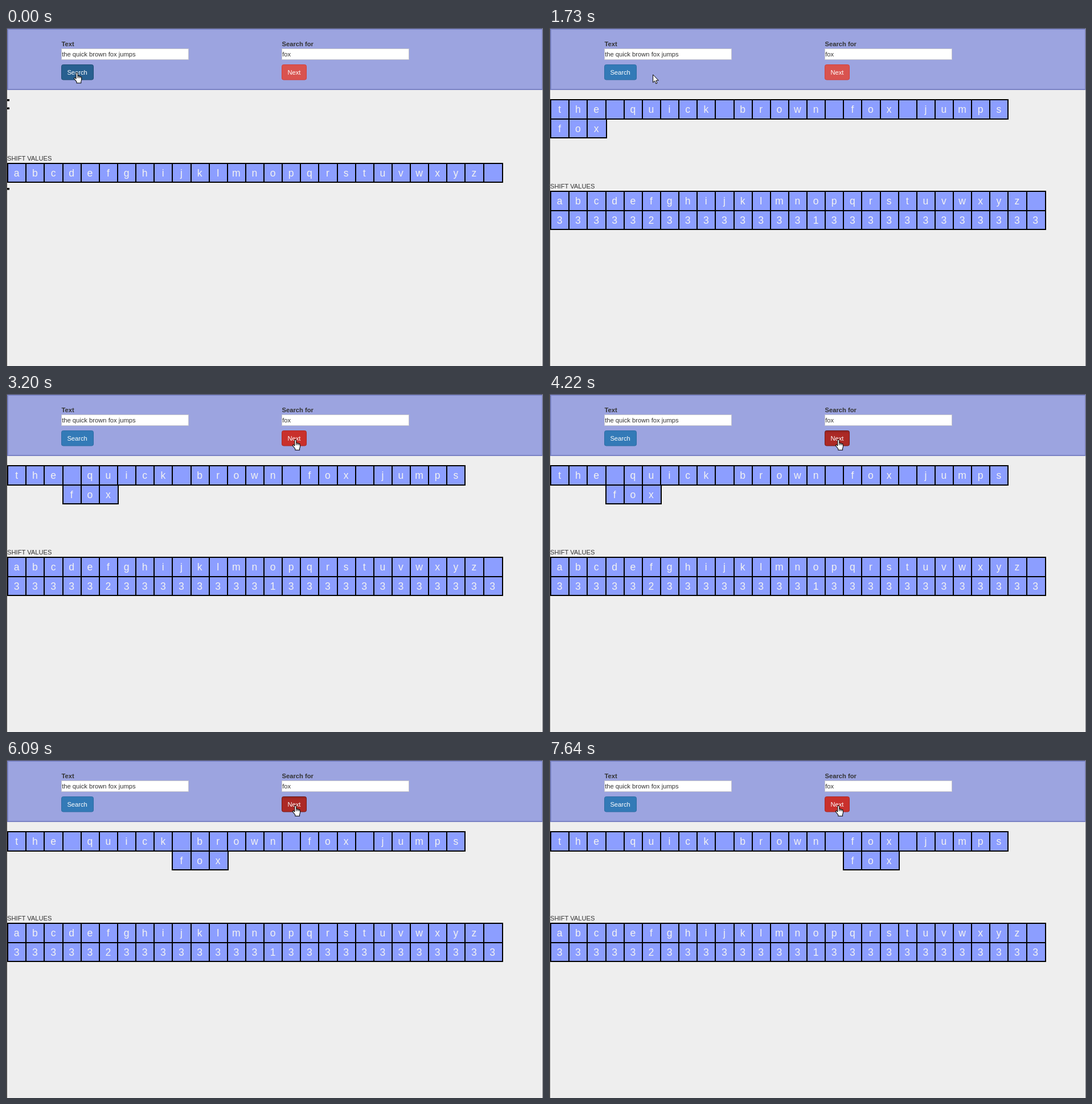
An HTML page that plays this animation: 943x594 px, repeating every 8 s.

```html
<!DOCTYPE html>
<html lang="en">
<head>
<meta charset="utf-8">
<title>Shift table search</title>
<style>
html, body { margin: 0; width: 100%; height: 100%; overflow: hidden; background: #eee; }
svg { display: block; width: 943px; height: 594px; }
text { font-family: "Liberation Sans", Arial, sans-serif; font-size: 11.2px; fill: #333; white-space: pre; }
.bold { font-weight: bold; }
.light { fill: #fff; }
.cell { font-size: 17.6px; fill: #f2f2f2; text-anchor: middle; }
</style>
</head>
<body>
<svg id="stage" viewBox="0 0 943 594" xmlns="http://www.w3.org/2000/svg">
  <defs>
    <linearGradient id="inset" x1="0" y1="0" x2="0" y2="1">
      <stop offset="0" stop-color="#000" stop-opacity=".16"/>
      <stop offset=".22" stop-color="#000" stop-opacity="0"/>
    </linearGradient>
  </defs>
  <rect width="943" height="594" fill="#eee"/>
  <rect x="3" y="2" width="939" height="106" fill="#9ca4e0" stroke="#7982c4" stroke-width="2"/>
  <path d="M0 0H943V1H2V594H0Z" fill="#4a4a4c"/>
  <rect x="942" y="0" width="1" height="594" fill="#77777c"/>
</svg>
<script>
const NS = "http://www.w3.org/2000/svg";
const stage = document.getElementById("stage");
const LOOP = 8000;
const phrase = "the quick brown fox jumps";
const pattern = "fox";
const alphabet = "abcdefghijklmnopqrstuvwxyz ";
const shifts = [...alphabet].map(c => ({ f: 2, o: 1 })[c] || 3).join("");

function add(tag, attrs, parent = stage, content) {
  const el = document.createElementNS(NS, tag);
  for (const k in attrs) el.setAttribute(k, attrs[k]);
  if (content) el.textContent = content;
  parent.appendChild(el);
  return el;
}
const rect = (x, y, width, height, fill, parent) =>
  add("rect", { x, y, width, height, fill }, parent);
const label = (x, y, str, cls, parent) => add("text", { x, y, class: cls }, parent, str);
const show = (el, on) => el.setAttribute("visibility", on ? "visible" : "hidden");

// Tables
const edge = i => Math.floor(2.7 + 32.13 * i);

function row(y, str, from, parent, bottom = 34) {
  const n = str.length, end = edge(from + n) + (n === 25 ? 0 : 1);
  rect(edge(from), y, end - edge(from) + 2, bottom + 2, "#000", parent);
  for (let i = 0; i < n; i++) {
    const x = edge(from + i) + 2;
    const right = i === n - 1 ? end : edge(from + i + 1);
    rect(x, y + 2, right - x, bottom - 2, "#8c9eff", parent);
    label(2.7 + 32.13 * (from + i + .5), y + 24, str[i], "cell", parent);
  }
}

function shiftTable(y, parent) {
  label(2, y - 4.5, "SHIFT VALUES", "", parent);
  row(y, alphabet, 0, parent, 34 - (y === 237));
}

const before = add("g", {});
for (const y of [125, 139.5, 281]) rect(2, y, 4, 3.5, "#000", before);
shiftTable(237, before);

const after = add("g", {});
row(125, phrase, 0, after);
shiftTable(286, after);
row(320, shifts, 0, after, 33);

const places = [0, 3, 6, 9, 12, 15, 16].map(from => {
  const g = add("g", {});
  row(159, pattern, from, g, 33);
  return g;
});

// Form
function field(x, title, value) {
  label(x + .5, 31.5, title, "bold");
  add("rect", { x: x + .5, y: 36.5, width: 223, height: 19, fill: "#fff", stroke: "#c4c4cc" });
  label(x + 1.2, 50, value, "");
}
field(97, "Text", phrase);
field(484, "Search for", pattern);

function button(x, width, str, looks) {
  const face = add("rect", { x: x + .5, y: 64.5, width: width - 1, height: 26.5, rx: 3 });
  const shade = add("rect", { x, y: 64, width, height: 27.5, rx: 3, fill: "url(#inset)" });
  label(x + 10.4, 82, str, "light");
  return {
    over: (px, py) => px >= x && px < x + width && py >= 64 && py < 92,
    set(state) {
      face.setAttribute("fill", looks[state][0]);
      face.setAttribute("stroke", looks[state][1]);
      show(shade, state === 2);
    }
  };
}
const search = button(97, 57, "Search",
  [["#337ab7", "#2e6da4"], ["#286090", "#204d74"]]);
const next = button(484, 44, "Next",
  [["#d9534f", "#d43f3a"], ["#c9302c", "#ac2925"], ["#ac2925", "#761c19"]]);

// Pointer, with its tip at 0,0
const pointer = add("g", { stroke: "#000", "stroke-linejoin": "round" });
const hand = add("g", { transform: "scale(.92) translate(-6.1 -.5)" }, pointer);
add("path", { fill: "#fff", "stroke-width": 1.1,
  d: "M4.5 12.2V2.2q0-1.7 1.6-1.7t1.6 1.7V7q1.2-1 2.6.6q1.4-.8 2.5.7q2-.4 2.1 1.4v4.2q0 1.6-.9 3V20.4H5.6v-2.6L1.2 12.6q-1-1.6.2-2.2t3.1 1.8Z" }, hand);
add("path", { fill: "none", "stroke-width": 1, d: "M7.7 7v4M10.3 7.6V11M12.8 8.3V11" }, hand);
const arrow = add("path", { fill: "#fff", "stroke-width": 1,
  d: "M.5.5V14.3L3.6 11.4 5.7 16.4 7.9 15.5 5.8 10.7H10.2Z" }, pointer);

const presses = [3130, 4220, 5240, 6090, 6860, 7500];
const moves = [3200, 4300, 5310, 6160, 6950, 7640];
const mix = (a, b, u) => a + (b - a) * u;

function tip(t) {
  if (t < 1630) return [124.5, 78.5];
  if (t >= 2730) return [508.3, 80.3];
  const step = Math.min(10, Math.floor((t - 1630) / 79));
  if (step >= 7) {
    const u = (step - 7) / 3;
    return [mix(493, 502, u), mix(85.3, 82.4, u)];
  }
  const u = (step + 1) / 8, ease = u * u * (3 - 2 * u);
  return [mix(124.5, 493, ease), mix(78.5, 85.3, ease) + 4 * Math.sin(Math.PI * ease)];
}

function draw(t) {
  const started = t >= 1080;
  show(before, !started);
  show(after, started);
  const place = moves.filter(m => t >= m).length;
  places.forEach((g, i) => show(g, started && i === place));

  const [x, y] = tip(t);
  const onSearch = search.over(x, y), onNext = next.over(x, y);
  const pressed = presses.some((p, i) => t >= p && t < moves[i]);
  search.set(onSearch ? 1 : 0);
  next.set(pressed ? 2 : onNext ? 1 : 0);
  pointer.setAttribute("transform", `translate(${x} ${y})`);
  show(hand, onSearch || onNext);
  show(arrow, !onSearch && !onNext);
}

const start = performance.now();
function tick() {
  draw((performance.now() - start) % LOOP);
  requestAnimationFrame(tick);
}
tick();
</script>
</body>
</html>
```
